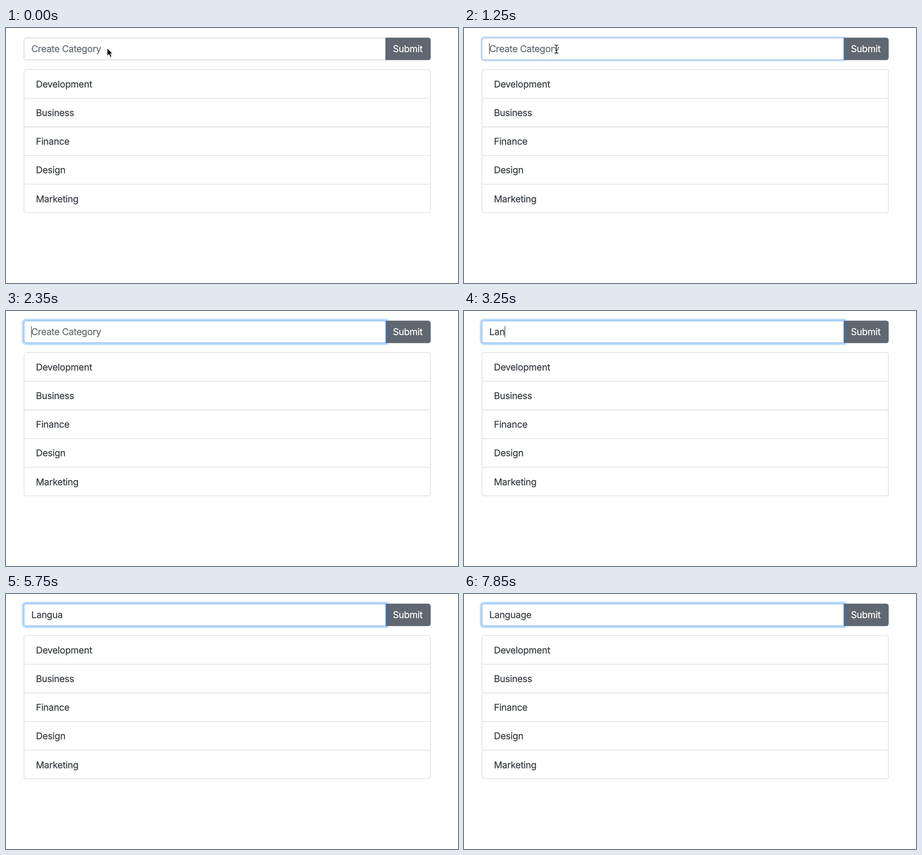
An HTML page for the animation above (8 s loop, 996 px wide and 562 px high).

```html
<!DOCTYPE html>
<html lang="en">
<head>
<meta charset="utf-8">
<title>Category form</title>
<style>
  html, body { margin: 0; width: 100%; height: 100%; overflow: hidden; background: #fff; }
  svg { display: block; width: 996px; height: 562px; }
  text {
    font: 400 20.4px Inter, "Open Sans", sans-serif;
    letter-spacing: -0.32px;
    text-rendering: geometricPrecision;
    fill: currentColor;
    stroke: currentColor;
    stroke-width: .25px;
    color: #343a40;
  }
</style>
</head>
<body>
<svg viewBox="0 0 996 562" xmlns="http://www.w3.org/2000/svg">
  <path id="field" fill="#fff" stroke="#c6ccd4" stroke-width="1.3"/>
  <path id="button" fill="#5f6870"/>
  <text x="852.6" y="53" style="color:#fff">Submit</text>
  <g id="focus">
    <path id="ring" fill="#007bff" fill-rule="evenodd"/>
    <path id="edge" fill="none" stroke-width="1.3"/>
  </g>
  <g id="list" fill="none" stroke="#d8d9da" stroke-width="1.3"></g>
  <text id="hint" x="55.8" y="53" style="color:#5f6870">Create Category</text>
  <text id="value" x="55.8" y="53"></text>
  <rect id="caret" y="33.5" width="1.3" height="24.5" fill="#3d434a"/>
  <g id="arrow" transform="translate(222.8 43.8)">
    <path d="M0 0V18.4L4.2 14.6L7 21L10.4 19.4L7.6 13.2H12.6Z" fill="#000" opacity=".16" transform="translate(0 1.4)"/>
    <path d="M.7 1.6V16.6L4.4 13L7.2 19.8L9.3 18.8L6.5 12.2H11Z" fill="#000" stroke="#fff" stroke-width="1.3" paint-order="stroke"/>
  </g>
  <g id="beam" fill="none" stroke-linecap="round">
    <path id="halo" stroke="#fff" stroke-width="3.4"/>
    <path id="stem" stroke="#111" stroke-width="1.5"/>
  </g>
</svg>
<script>
const LOOP = 8000, STEP = 50;
const FOCUS = 1200, HIDE_MOUSE = 2350, BLINK = 500;
const MOVE = { start: 750, end: 950, from: [219, 45], to: [203.6, 46.5] };
const WORD = "Language";
const KEYS = [2400, 3000, 3250, 4250, 4800, 5250, 6000, 6350];
const BOX = { x: 39, y: 21.2, w: 798.2, h: 49.6 };

const $ = id => document.getElementById(id);
const set = (el, attrs) => Object.entries(attrs).forEach(([k, v]) => el.setAttribute(k, v));
const show = (el, on) => el.setAttribute("visibility", on ? "visible" : "hidden");
const mix = (a, b, p) => a + (b - a) * p;

// Rectangle with separate corner radii for its left and right sides
function box(x, y, w, h, l, r) {
  const arc = (q, dx, dy) => q ? `a${q} ${q} 0 0 1 ${dx} ${dy}` : "";
  return `M${x + l} ${y}H${x + w - r}${arc(r, r, r)}V${y + h - r}${arc(r, -r, r)}` +
    `H${x + l}${arc(l, -l, -l)}V${y + l}${arc(l, l, -l)}Z`;
}

function addList() {
  const top = 91.7, pitch = 63.15, left = 39.65, width = 895.5;
  const names = ["Development", "Business", "Finance", "Design", "Marketing"];
  let out = `<path d="${box(left, top, width, pitch * names.length, 4.6, 4.6)}"/>`;
  names.forEach((name, i) => {
    const y = top + pitch * i;
    if (i) out += `<path d="M${left} ${y}h${width}"/>`;
    out += `<text x="66" y="${(y + 39.2).toFixed(1)}">${name}</text>`;
  });
  $("list").innerHTML = out;
}

function setup() {
  const { x, y, w, h } = BOX;
  const outline = box(x + .65, y + .65, w - 1.3, h - 1.3, 4.6, 0);
  set($("field"), { d: outline });
  set($("edge"), { d: outline });
  set($("button"), { d: box(836, y, 99.8, h, 0, 5.2) });
  const beam = "M-3.6 -9Q-.4 -9 0 -7Q.4 -9 3.6 -9M0 -7V7M-3.6 9Q-.4 9 0 7Q.4 9 3.6 9M-2 2.6H2";
  set($("halo"), { d: beam });
  set($("stem"), { d: beam });
  addList();
}

function drawFocus(t) {
  show($("focus"), t >= FOCUS);
  const k = Math.min(Math.max((t - FOCUS) / 100, 0), 1);
  const p = 1 - (1 - k) ** 1.74;
  const s = 4.2 * p, { x, y, w, h } = BOX;
  const outer = box(x - s, y - s, w + 2 * s, h + 2 * s, 5.2 + s, 0);
  set($("ring"), { d: outer + box(x, y, w, h, 5.2, 0), "fill-opacity": .27 * p });
  const rgb = [[198, 128], [204, 185], [212, 250]].map(([a, b]) => Math.round(mix(a, b, p)));
  set($("edge"), { stroke: `rgb(${rgb})` });
}

function drawMouse(t) {
  const moving = t >= MOVE.start;
  show($("arrow"), !moving);
  show($("beam"), moving && t < HIDE_MOUSE);
  const k = Math.min(Math.max((t - MOVE.start) / (MOVE.end - MOVE.start), 0), 1);
  const p = 1 - (1 - k) ** 2;
  const [x, y] = MOVE.from.map((a, i) => mix(a, MOVE.to[i], p));
  set($("beam"), { transform: `translate(${x} ${y})` });
}

function drawText(t) {
  const n = KEYS.filter(k => k <= t).length;
  const value = $("value");
  value.textContent = WORD.slice(0, n);
  show($("hint"), !n);
  const last = n ? KEYS[n - 1] : FOCUS - STEP;
  const lit = Math.floor((t - last) / BLINK) % 2 === 0;
  show($("caret"), t >= FOCUS && lit);
  set($("caret"), { x: 55.5 + (n ? value.getComputedTextLength() : 0) });
}

function draw(ms) {
  const t = Math.floor((ms % LOOP) / STEP) * STEP;
  drawFocus(t);
  drawMouse(t);
  drawText(t);
}

setup();
const began = performance.now();
function tick() {
  draw(performance.now() - began);
  requestAnimationFrame(tick);
}
tick();
</script>
</body>
</html>
```
